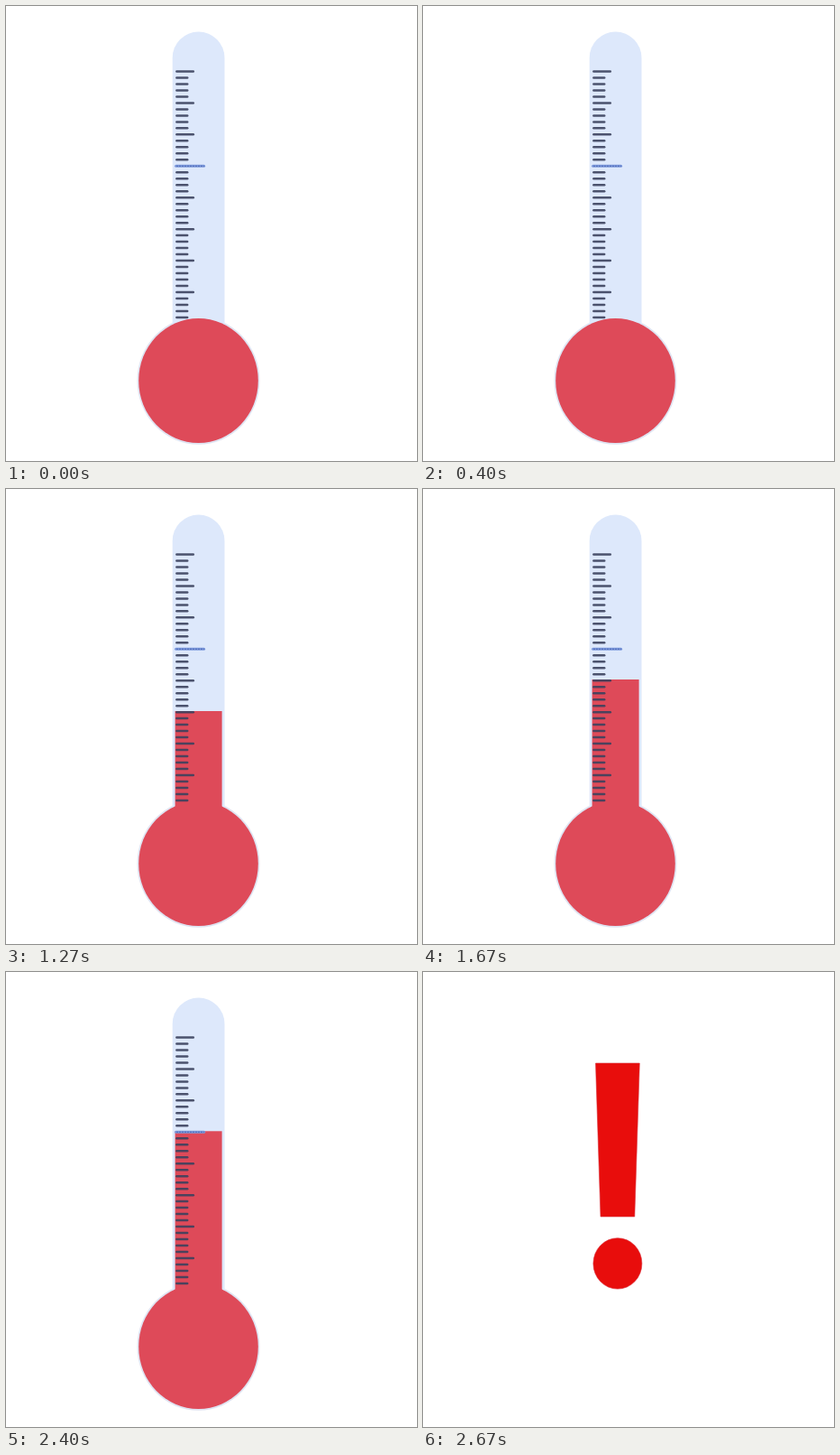
Animation of 456 by 504 pixels, one loop 3.01 s. Source, as an HTML page:

```html
<!DOCTYPE html>
<html lang="en">
<head>
<meta charset="utf-8">
<title>Thermometer</title>
<style>
  html, body { margin: 0; width: 100%; height: 100%; overflow: hidden; background: #fff; }
  svg { display: block; width: 100vw; height: 100vh; }
</style>
</head>
<body>
<svg viewBox="0 0 456 504">
  <g id="thermometer">
    <ellipse cx="213.5" cy="415" rx="68" ry="70.8" fill="#dfe4f2"/>
    <path d="M184.7 360V57.4a28.9 28.9 0 0 1 57.8 0V360Z" fill="#dde8fb"/>
    <ellipse cx="213.5" cy="415" rx="66.3" ry="69" fill="#de4a59"/>
    <rect id="fill" x="187.6" width="52" fill="#de4a59"/>
    <g id="ticks" stroke-width="2.5" stroke-linecap="round"></g>
  </g>
  <g id="alert" fill="#e80d0c" stroke="#d9303c" stroke-width=".6">
    <path d="M191.5 101H240.3L234.8 271H197Z"/>
    <ellipse cx="215.9" cy="322.9" rx="27" ry="28.2"/>
  </g>
</svg>
<script>
const LOOP = 3010;
const FILL_BOTTOM = 356;
// start time in ms, top of the red column (null shows the alert)
const STEPS = [[0, FILL_BOTTOM], [670, 246], [1670, 211], [2000, 176.3], [2670, null]];

const byId = id => document.getElementById(id);
const thermometer = byId('thermometer'), alertMark = byId('alert'), fill = byId('fill');

function addLine(x1, x2, y, attrs) {
  const line = document.createElementNS('http://www.w3.org/2000/svg', 'line');
  const all = { x1, x2, y1: y, y2: y, ...attrs };
  for (const key in all) line.setAttribute(key, all[key]);
  byId('ticks').append(line);
}

for (let i = 0; i < 40; i++) {
  const y = 72.5 + i * 6.985;
  if (i === 15) {
    addLine(188.6, 219.6, y, { stroke: '#7c99dc', 'stroke-width': 3 });
    addLine(189, 220, y, { stroke: '#5069b4', 'stroke-width': 1, 'stroke-dasharray': '2 1', 'stroke-linecap': 'butt' });
  } else {
    addLine(189.4, i % 5 ? 201.2 : 207.8, y, { stroke: '#3b415d', 'stroke-opacity': .9 });
  }
}

function draw(time) {
  const t = time % LOOP;
  const top = STEPS.findLast(([start]) => t >= start)[1];
  const hot = top === null;
  thermometer.style.display = hot ? 'none' : '';
  alertMark.style.display = hot ? '' : 'none';
  if (!hot) {
    fill.setAttribute('y', top);
    fill.setAttribute('height', FILL_BOTTOM - top);
    fill.style.display = top < FILL_BOTTOM ? '' : 'none';
  }
}

const origin = performance.now();
function tick() {
  draw(performance.now() - origin);
  requestAnimationFrame(tick);
}
tick();
</script>
</body>
</html>
```
